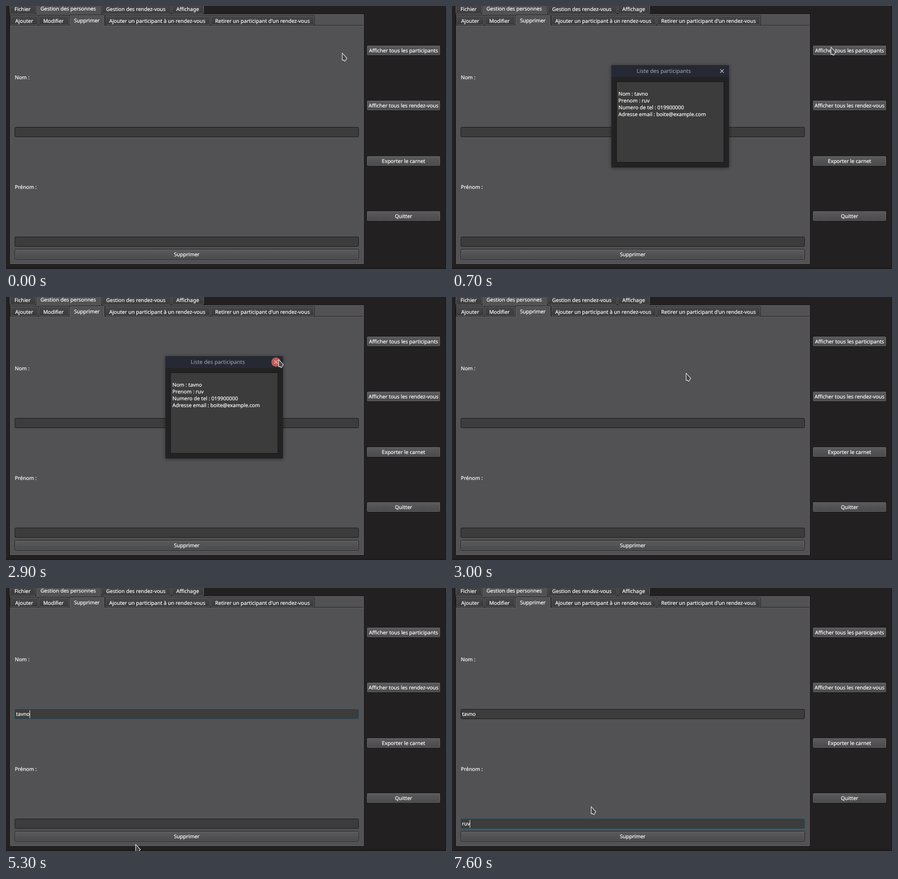
Animation, 969 px wide and 578 px high, one loop 8 s. Source, as an HTML page:

```html
<!DOCTYPE html>
<html lang="fr">
<head>
<meta charset="utf-8">
<title>Carnet</title>
<style>
  html, body { margin: 0; width: 100%; height: 100%; overflow: hidden; background: #222021; }
  svg { display: block; width: 100vw; height: 100vh; }
  text {
    font: 11.36px "Noto Sans", "Open Sans", sans-serif;
    fill: #fff; stroke: #fff; stroke-width: .22px;
    text-rendering: geometricPrecision; white-space: pre;
  }
  text.title { font-size: 12px; fill: #a8acb3; stroke: none; }
</style>
</head>
<body>
<svg id="stage" viewBox="0 0 969 578">
  <defs>
    <linearGradient id="button" x2="0" y2="1">
      <stop offset="0" stop-color="#5b5b5d"/><stop offset="1" stop-color="#4a4a4c"/>
    </linearGradient>
    <linearGradient id="tab" x2="0" y2="1">
      <stop offset="0" stop-color="#474749"/><stop offset="1" stop-color="#39393b"/>
    </linearGradient>
    <filter id="shadow" x="-10%" y="-10%" width="120%" height="120%">
      <feDropShadow dx="0" dy="1" stdDeviation="4" flood-color="#000" flood-opacity=".45"/>
    </filter>
  </defs>
</svg>
<script>
const LOOP = 8000, STEP = 100;
const PANEL = '#525254', LIGHT = '#69696b', DARK = '#171617', BASE = '#3c3c3c', FOCUS = '#1b4a60';
const stage = document.getElementById('stage');

function add(parent, tag, attrs, content) {
  const el = document.createElementNS('http://www.w3.org/2000/svg', tag);
  for (const key in attrs) el.setAttribute(key, attrs[key]);
  if (content) el.textContent = content;
  parent.append(el);
  return el;
}

const box = (parent, x, y, width, height, fill, more) =>
  add(parent, 'rect', { x, y, width, height, fill, ...more });

// One pixel outline lying inside the given box
const frame = (parent, x, y, w, h, fill, stroke, rx = 0) =>
  box(parent, x + .5, y + .5, w - 1, h - 1, fill, { stroke, rx });

const label = (parent, x, y, str, more) => add(parent, 'text', { x, y, ...more }, str);
const centred = (parent, x, y, str, more) => label(parent, x, y, str, { 'text-anchor': 'middle', ...more });
const show = (el, on) => el.setAttribute('visibility', on ? 'inherit' : 'hidden');

function tab(x, right, top, bottom, textX, str, active) {
  const w = right - x;
  frame(stage, x - 1, top - 1, w + 2, bottom - top + 2, 'none', DARK, 2);
  frame(stage, x, top, w, bottom - top + (active ? 3 : 0), active ? PANEL : 'url(#tab)', LIGHT, 2);
  if (active) box(stage, x + 1, bottom - 2, w - 2, 6, PANEL);
  centred(stage, textX, (top < 5 ? 11 : 37) - (active ? 1 : 0), str);
}

function button(x, y, w, h, str) {
  frame(stage, x - 1, y - 1, w + 2, h + 2, 'none', DARK, 2);
  frame(stage, x, y, w, h, 'url(#button)', LIGHT, 1);
  const glow = box(stage, x + 1, y + 1, w - 2, h - 2, '#fff', { opacity: .05 });
  centred(stage, x + w / 2, y + h / 2 + 4, str);
  show(glow, false);
  return glow;
}

function field(y) {
  const edge = frame(stage, 19, y, 758, 22, BASE, DARK, 2);
  const text = label(stage, 22, y + 15, '');
  const caret = box(stage, 22, y + 3, 1, 17, '#fff');
  return (str, focused, caretOn) => {
    text.textContent = str;
    edge.setAttribute('stroke', focused ? FOCUS : DARK);
    caret.setAttribute('x', 22 + Math.round(str ? text.getComputedTextLength() : 0));
    show(caret, caretOn);
  };
}

// Window and its two levels of tabs
box(stage, 0, 0, 969, 578, '#222021');
box(stage, 0, 575, 969, 3, '#1c1a1b');
box(stage, 967, 0, 2, 578, '#1c1a1b');
frame(stage, 8, 17, 781, 551, 'none', DARK);
frame(stage, 9, 18, 779, 549, PANEL, LIGHT);
tab(8, 66, -4, 17, 36.5, 'Fichier');
tab(210, 364, -4, 17, 286, 'Gestion des rendez-vous');
tab(365, 436, -4, 17, 400, 'Affichage');
tab(67, 209, -6, 18, 137, 'Gestion des personnes', true);

box(stage, 10, 42, 777, 1, DARK);
box(stage, 10, 43, 777, 1, LIGHT);
tab(10, 71, 21, 42, 40, 'Ajouter');
tab(72, 139, 21, 42, 104.5, 'Modifier');
tab(219, 450, 21, 42, 333, 'Ajouter un participant à un rendez-vous');
tab(451, 679, 21, 42, 565, "Retirer un participant d'un rendez-vous");
tab(140, 217, 20, 43, 178, 'Supprimer', true);

label(stage, 19.5, 161, 'Nom :');
label(stage, 19.5, 402, 'Prénom :');
const setLast = field(266), setFirst = field(507);
button(20, 535, 756, 21, 'Supprimer');

const glow = button(795, 87, 161, 21, 'Afficher tous les participants');
['Afficher tous les rendez-vous', 'Exporter le carnet', 'Quitter']
  .forEach((str, i) => button(795, 208 + Math.round(i * 121.5), 161, 21, str));

// Participants dialog
const LAST = 'tavno', FIRST = 'ruv';
const dialog = add(stage, 'g', {});
box(dialog, 351, 130, 259, 225, '#222021', { filter: 'url(#shadow)' });
box(dialog, 351, 130, 259, 26, '#262933');
centred(dialog, 466.5, 147, 'Liste des participants', { class: 'title' });
const closeDisc = add(dialog, 'circle', { cx: 594.5, cy: 143, r: 10.2, fill: '#bb5a55' });
const closeMark = add(dialog, 'path', { d: 'M590.5 139l8 8m0-8l-8 8', 'stroke-width': 1.2 });
frame(dialog, 362, 166, 237, 178, BASE, DARK);
['Nom : ' + LAST, 'Prenom : ' + FIRST, 'Numero de tel : 019900000', 'Adresse email : boite@example.com']
  .forEach((str, i) => label(dialog, 366.5, 197 + i * 14.85, str));

// Pointers
const arrow = add(stage, 'path', {
  d: 'M.5 .5V16.2L3.8 15.6 5.4 18Q7.6 18.8 8 15.8L10.8 11.6Z',
  fill: '#474749', stroke: '#fff', 'stroke-width': 1.1, 'stroke-linejoin': 'round'
});
const beam = add(stage, 'g', { fill: 'none' });
const BEAM = 'M-3 -7.5H3M-3 7.5H3M0 -7.5V7.5';
add(beam, 'path', { d: BEAM, stroke: '#1c1c1c', 'stroke-width': 3.2 });
add(beam, 'path', { d: BEAM, stroke: '#fff', 'stroke-width': 1.4 });

// Pointer path: time, x, y
const PATH = [
  [0, 740, 103], [500, 834, 90], [700, 834, 90], [1500, 374, 187], [1600, 374, 187],
  [1800, 396.5, 183], [1900, 396.5, 183], [2100, 542, 164], [2300, 542, 164],
  [2700, 600, 137], [2900, 600, 137], [3400, 173, 289], [3500, 173, 289],
  [3600, 157.5, 277.5], [5200, 157.5, 277.5], [5300, 285, 563], [5400, 285, 563],
  [5500, 409, 560], [5600, 350, 516], [5700, 350, 516], [5800, 290, 514],
  [6500, 290, 514], [6700, 295, 514], [6800, 295, 514], [7000, 306, 480], [LOOP, 306, 480]
];
const LAST_KEYS = [4400, 4500, 4600, 4700, 5000];
const FIRST_STEPS = [[0, ''], [5900, 'r'], [6100, 'ru'], [6400, 'rub'], [7400, 'ru'], [7600, FIRST]];

const within = (t, from, to) => t >= from && t < to;
const inside = ([x, y], l, t, r, b) => x >= l && x < r && y >= t && y < b;

function pointerAt(t) {
  const i = PATH.findIndex(key => key[0] > t);
  const [t0, x0, y0] = PATH[i - 1], [t1, x1, y1] = PATH[i];
  const k = (t - t0) / (t1 - t0);
  return [x0 + (x1 - x0) * k, y0 + (y1 - y0) * k];
}

function render(ms) {
  const t = Math.floor(ms % LOOP / STEP) * STEP;
  const p = pointerAt(t);
  const open = within(t, 700, 3000);

  show(dialog, open);
  show(glow, !open && inside(p, 795, 87, 956, 108));
  const hot = open && Math.hypot(p[0] - 594.5, p[1] - 143) < 12;
  show(closeDisc, hot);
  closeMark.setAttribute('stroke', hot ? '#e0c4c4' : '#c9ccd2');

  const lastFocused = within(t, 3700, 5800), firstFocused = t >= 5800;
  const last = LAST.slice(0, LAST_KEYS.filter(k => k <= t).length);
  const first = FIRST_STEPS.filter(s => s[0] <= t).pop()[1];
  setLast(last, lastFocused, lastFocused && !within(t, 4300, 4400) && t < 5500);
  setFirst(first, firstFocused, firstFocused && !within(t, 6900, 7400));

  // The pointer hides while typing
  const visible = !within(t, 4400, 5200) && !within(t, 5900, 6600);
  const text = open ? inside(p, 362, 167, 598, 343)
    : inside(p, 19, 266, 777, 288) || inside(p, 19, 507, 777, 529);
  show(arrow, visible && !text);
  show(beam, visible && text);
  (text ? beam : arrow).setAttribute('transform', `translate(${p.map(Math.round)})`);
}

const start = performance.now();
function tick() {
  render(performance.now() - start);
  requestAnimationFrame(tick);
}
tick();
</script>
</body>
</html>
```
